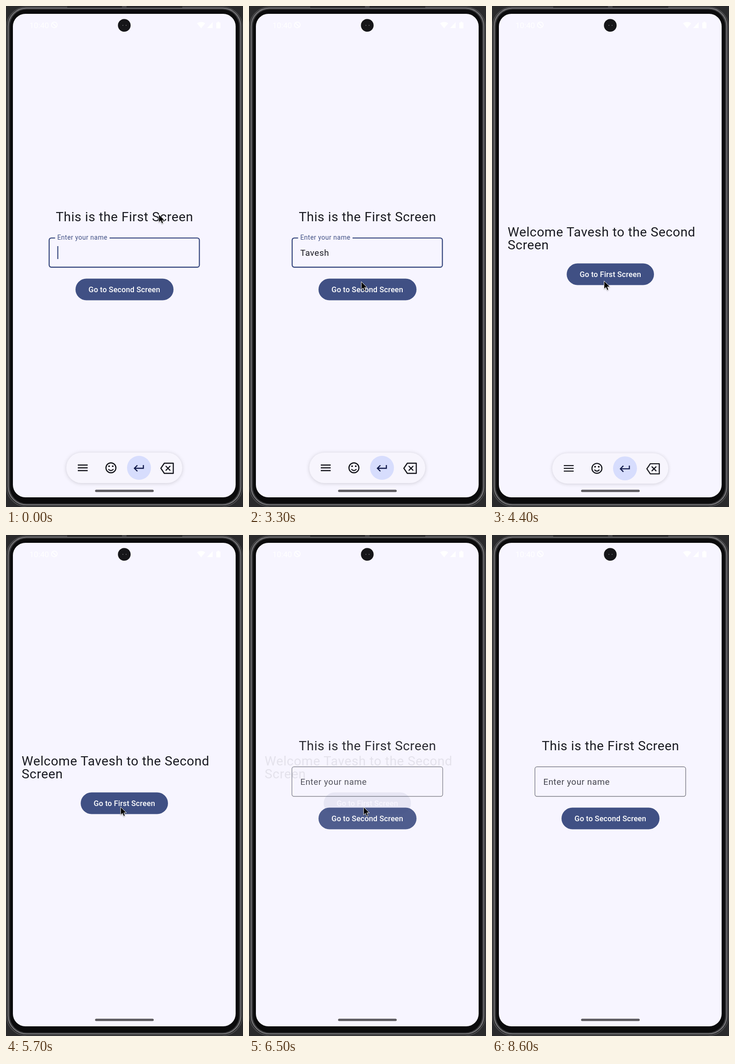
Write an HTML page that moves like this. It is 515 by 1087 pixels and loops after 8.9 s.

```html
<!DOCTYPE html>
<html lang="en">
<head>
<meta charset="utf-8">
<title>Two screens</title>
<style>
  html, body { margin: 0; width: 100%; height: 100%; overflow: hidden; background: #2a2a2c; }
  svg { display: block; width: 515px; height: 1087px; font-family: Roboto, sans-serif; }
  text { white-space: pre; }
  .body { font-size: 28.18px; letter-spacing: .587px; fill: #1a1b21; }
  .field { font-size: 18.78px; letter-spacing: .587px; fill: #1a1b21; }
  .label { font-size: 14.09px; letter-spacing: .47px; fill: #405084; }
  .button { font-size: 16.44px; letter-spacing: .117px; font-weight: 500; fill: #fff; text-anchor: middle; }
  .line { fill: none; stroke: #15161c; stroke-width: 2.4; }
  #bar > rect { filter: drop-shadow(0 1px 4px rgba(0, 0, 0, .16)); }
  #pointer { filter: drop-shadow(0 1px 1px rgba(0, 0, 0, .35)); }
</style>
</head>
<body>
<svg viewBox="0 0 515 1087">
  <defs><clipPath id="glass"><rect x="15" y="17" width="484" height="1049" rx="27"/></clipPath></defs>

  <!-- phone body -->
  <rect width="515" height="1087" fill="#2a2a2c"/>
  <rect x="1" y="2" width="513" height="1084" rx="44" fill="#1b1b1c" stroke="#505052" stroke-width="1.5"/>
  <rect x="4.5" y="4.5" width="506" height="1078" rx="40" fill="#39393b" stroke="#7d7c7f" stroke-width="2"/>
  <rect x="8.5" y="7.5" width="498" height="1072" rx="36" fill="#0b0b0c"/>
  <path d="M133 2.5H383" stroke="#161617" stroke-width="2"/>
  <path d="M252 1.5h10" stroke="#48484a" stroke-width="3"/>
  <rect x="15" y="17" width="484" height="1049" rx="27" fill="#f7f5ff"/>

  <!-- status bar -->
  <g fill="#fff">
    <text x="51" y="47.5" font-size="17">10:40</text>
    <path d="M424 48.5l-9-11q9-6 18 0zM437 48h12V35zM457 36h2.500v-2h4v2h2.500v12.500h-9z"/>
    <path d="M100.500 36.500l9 9" stroke="#fff" stroke-width="1.8"/>
    <circle cx="105" cy="41" r="6.200" fill="none" stroke="#fff" stroke-width="1.8"/>
  </g>
  <circle cx="257" cy="42" r="13.800" fill="#161619"/>
  <path d="M253 42h2m5 0h2" stroke="#55555a" stroke-width="2"/>

  <g id="first">
    <text class="body" x="108.200" y="466.500">This is the First Screen</text>
    <g id="focused">
      <path d="M106.700 503.300H98.500a4.700 4.700 0 0 0-4.700 4.700v54a4.700 4.700 0 0 0 4.700 4.700h317a4.700 4.700 0 0 0 4.700-4.700v-54a4.700 4.700 0 0 0-4.700-4.700H225"
        fill="none" stroke="#405084" stroke-width="2.35"/>
      <text class="label" x="111.400" y="507">Enter your name</text>
      <text class="field" id="typed" x="111.400" y="541.500"></text>
      <rect id="caret" y="521" width="2.300" height="28" fill="#405084"/>
    </g>
    <g id="empty">
      <rect x="93.300" y="502.800" width="327.600" height="64.400" rx="4.700" fill="none" stroke="#696a73" stroke-width="1.200"/>
      <text class="field" x="111.400" y="541.500" style="fill:#45464f">Enter your name</text>
    </g>
    <rect x="151" y="591.500" width="213" height="47" rx="23.500" fill="#405084"/>
    <text class="button" x="257.200" y="620.700">Go to Second Screen</text>
  </g>

  <g id="second">
    <text class="body" id="welcome" x="34" y="499.500"></text>
    <text class="body" x="34" y="527.700">Screen</text>
    <rect x="162.300" y="558.500" width="189.700" height="47" rx="23.500" fill="#405084"/>
    <text class="button" x="257.200" y="587.700">Go to First Screen</text>
  </g>

  <g clip-path="url(#glass)">
    <g id="bar">
      <rect x="131" y="969" width="252" height="66" rx="33" fill="#f7f5fd"/>
      <path class="line" d="M156 996h21.500m-21.500 6h21.500m-21.500 6h21.500"/>
      <circle class="line" cx="228" cy="1002" r="10.800"/>
      <path class="line" d="M222.500 1005q5.500 6 11 0"/>
      <circle cx="224" cy="998.500" r="1.800"/>
      <circle cx="232" cy="998.500" r="1.800"/>
      <circle cx="289" cy="1002" r="26" fill="#d7ddfd"/>
      <path class="line" d="M298.500 996v7H279m6.500-6.500l-6.500 6.500 6.500 6.500" style="stroke:#10194a"/>
      <path class="line" stroke-linejoin="round" d="M336.500 1003l7.500-11h19.500v22H344zM347 998l10 10m0-10l-10 10"/>
    </g>
  </g>
  <rect x="193.500" y="1049.500" width="127.500" height="5" rx="2.500" fill="#5b595e"/>

  <path id="pointer" d="M0 0V17.500l4-3.700 2.700 6.400 3-1.300-2.600-6.100h5.600Z" fill="#000" stroke="#fff" stroke-width="1"/>
</svg>

<script>
const LOOP = 8900, STEP = 100;
const NAME = "Tavesh";
const KEYS = [1400, 1500, 1800, 2000, 2200, 2400];   // one time per typed letter
const OPEN = 3465, BACK = 6035, FADE = 700;
const HIDE = 4360, HIDE_TIME = 400;
const PATH = [                                       // time, x, y
  [0, 332, 452], [400, 332, 452], [1300, 271, 526], [2500, 271, 526],
  [3300, 244, 598], [3800, 243, 597], [4300, 243, 597], [4800, 248, 592],
  [5600, 248, 592], [5700, 249, 590], [6800, 249, 590], [7700, 226, 596],
  [7800, 183, 537], [7900, 183, 537], [8500, 356, 455]
];
const POINTER_END = 8600;

const $ = id => document.getElementById(id);
const clamp = v => Math.min(1, Math.max(0, v));
const show = (id, on) => $(id).style.display = on ? "" : "none";

// cubic-bezier(.4, 0, .2, 1)
function ease(p) {
  p = clamp(p);
  let lo = 0, hi = 1;
  for (let i = 0; i < 24; i++) {
    const s = (lo + hi) / 2, r = 1 - s;
    if (1.2 * r * r * s + .6 * r * s * s + s ** 3 < p) lo = s; else hi = s;
  }
  return lo * lo * (3 - 2 * lo);
}

function pointerAt(t) {
  const i = PATH.findIndex(k => k[0] > t);
  if (i < 0) return PATH[PATH.length - 1].slice(1);
  const [a, b] = [PATH[i - 1], PATH[i]];
  const p = (t - a[0]) / (b[0] - a[0]), s = p * p * (3 - 2 * p);
  return [1, 2].map(n => a[n] + (b[n] - a[n]) * s);
}

function caretOn(t) {
  const last = KEYS.filter(k => k <= t).pop() ?? -300;
  return (t - last) % 1000 < 500;
}

function draw(t) {
  const second = t < BACK ? ease((t - OPEN) / FADE) : 1 - ease((t - BACK) / FADE);
  $("second").style.opacity = second;
  $("first").style.opacity = 1 - second;

  show("focused", t < BACK);
  show("empty", t >= BACK);
  $("typed").textContent = NAME.slice(0, KEYS.filter(k => k <= t).length);
  if (t < BACK) $("caret").setAttribute("x", 111.4 + $("typed").getComputedTextLength());
  show("caret", caretOn(t));

  const hide = clamp((t - HIDE) / HIDE_TIME) ** 1.6;
  $("bar").style.opacity = 1 - hide;
  $("bar").setAttribute("transform", `translate(0 ${45 * hide})`);

  show("pointer", t < POINTER_END);
  $("pointer").setAttribute("transform", `translate(${pointerAt(t)})`);
}

$("welcome").textContent = `Welcome ${NAME} to the Second`;
const start = performance.now();
function tick() {
  const t = (performance.now() - start) % LOOP;
  draw(Math.floor(t / STEP) * STEP);
  requestAnimationFrame(tick);
}
tick();
</script>
</body>
</html>
```
